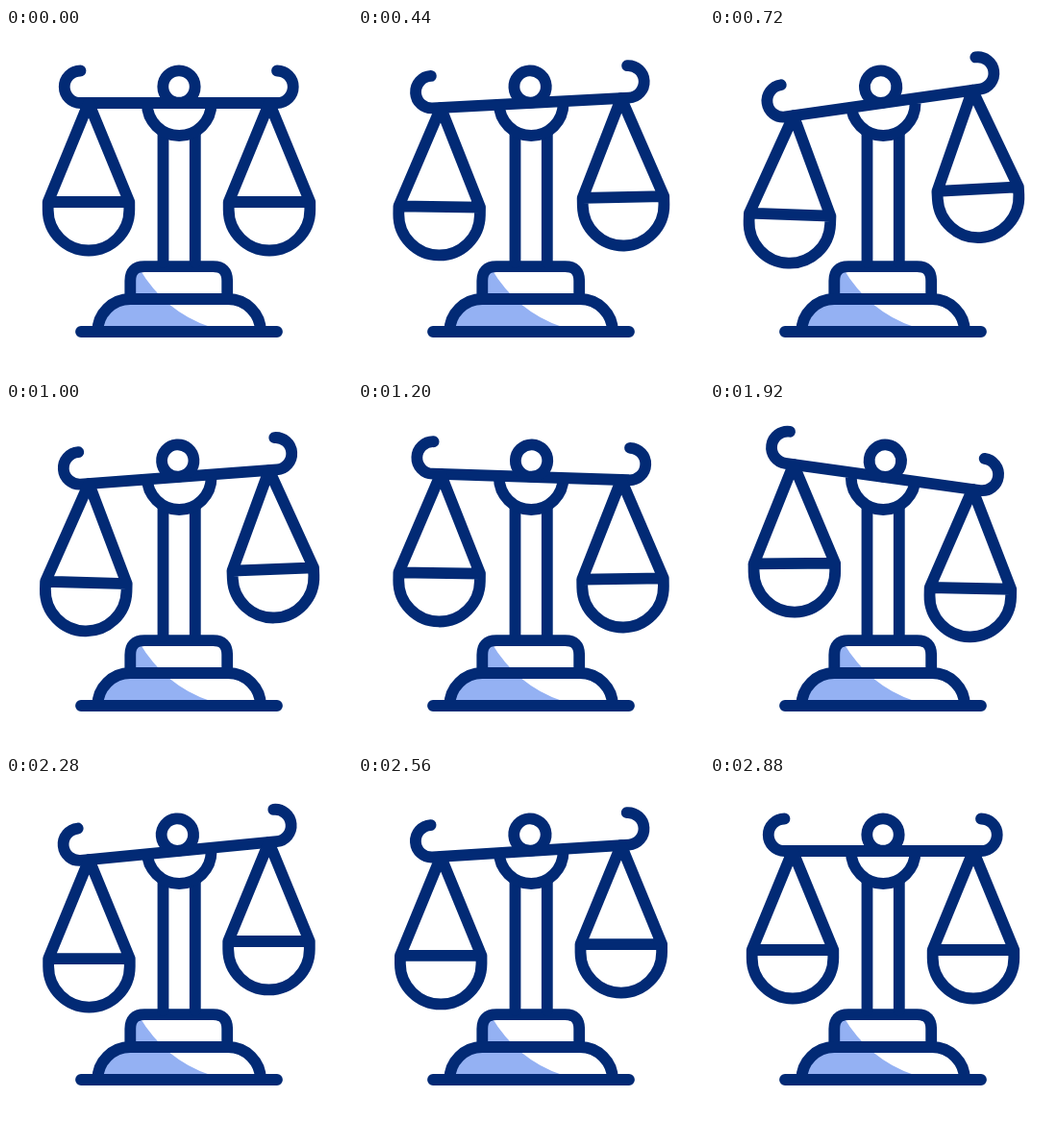
An HTML page for the animation above (3 s loop, 360 px wide and 360 px high).

```html
<!DOCTYPE html>
<html lang="en">
<head>
<meta charset="utf-8">
<title>Scales</title>
<style>
  html, body { margin: 0; width: 100%; height: 100%; overflow: hidden; background: #fff; }
  svg { display: block; width: 100vw; height: 100vh; }
</style>
</head>
<body>
<svg viewBox="0 0 360 360" fill="none" stroke="#022a75" stroke-width="11.8" stroke-linecap="round" stroke-linejoin="round">
  <defs>
    <path id="upper" d="M129.3 282V263Q129.3 248.2 144 248.2H215.5Q230.2 248.2 230.2 263V282"/>
    <path id="lower" d="M95.3 316A34 34 0 0 1 129.3 282H231A34 34 0 0 1 265 316"/>
    <clipPath id="base"><use href="#upper"/><use href="#lower"/></clipPath>
    <path id="pan" d="M0 0L-42.3 103H42.3ZM-42.3 103V111.2A42.3 42.3 0 0 0 42.3 111.2V103"/>
  </defs>

  <path d="M138.5 250Q165.5 295.5 212.5 311V316H90V250Z" fill="#94b1f3" stroke="none" clip-path="url(#base)"/>
  <use href="#upper"/>
  <use href="#lower"/>
  <path d="M78 316H282M163.5 108V244M196.8 108V244"/>
  <path d="M146.8 78.6A33.4 33.4 0 0 0 213.6 78.6" fill="#fff" stroke-linecap="butt"/>

  <g id="beam">
    <path d="M77.5 44.5A16.7 16.7 0 0 0 77.5 78H282A16.7 16.7 0 0 0 282 44.5"/>
    <circle cx="180" cy="61" r="16.7" fill="#fff"/>
  </g>
  <use id="left" href="#pan"/>
  <use id="right" href="#pan"/>
</svg>
<script>
  const LOOP = 3000, PIVOT = { x: 180, y: 78 }, ARM = 94;
  const times = [240, 720, 1710, 2330, 2880];
  const angles = {
    beam: [0, -8.1, 12.7, -5.8, 0],
    left: [0, 2.1, -0.7, 0, 0],
    right: [0, -3.1, 1.6, 0, 0]
  };
  const byId = id => document.getElementById(id);

  // Sine ease between the neighbouring key angles
  function angleAt(keys, t) {
    const next = times.findIndex(time => t < time);
    if (next < 1) return 0;
    const p = (t - times[next - 1]) / (times[next] - times[next - 1]);
    const eased = (1 - Math.cos(Math.PI * p)) / 2;
    return keys[next - 1] + (keys[next] - keys[next - 1]) * eased;
  }

  function hang(id, side, tilt, t) {
    const x = PIVOT.x + side * ARM * Math.cos(tilt);
    const y = PIVOT.y + side * ARM * Math.sin(tilt);
    byId(id).setAttribute('transform', `translate(${x} ${y}) rotate(${angleAt(angles[id], t)})`);
  }

  const start = performance.now();
  function draw(now) {
    const t = Math.max(0, now - start) % LOOP;
    const degrees = angleAt(angles.beam, t);
    const tilt = degrees * Math.PI / 180;
    byId('beam').setAttribute('transform', `rotate(${degrees} ${PIVOT.x} ${PIVOT.y})`);
    hang('left', -1, tilt, t);
    hang('right', 1, tilt, t);
    requestAnimationFrame(draw);
  }
  draw(start);
</script>
</body>
</html>
```
